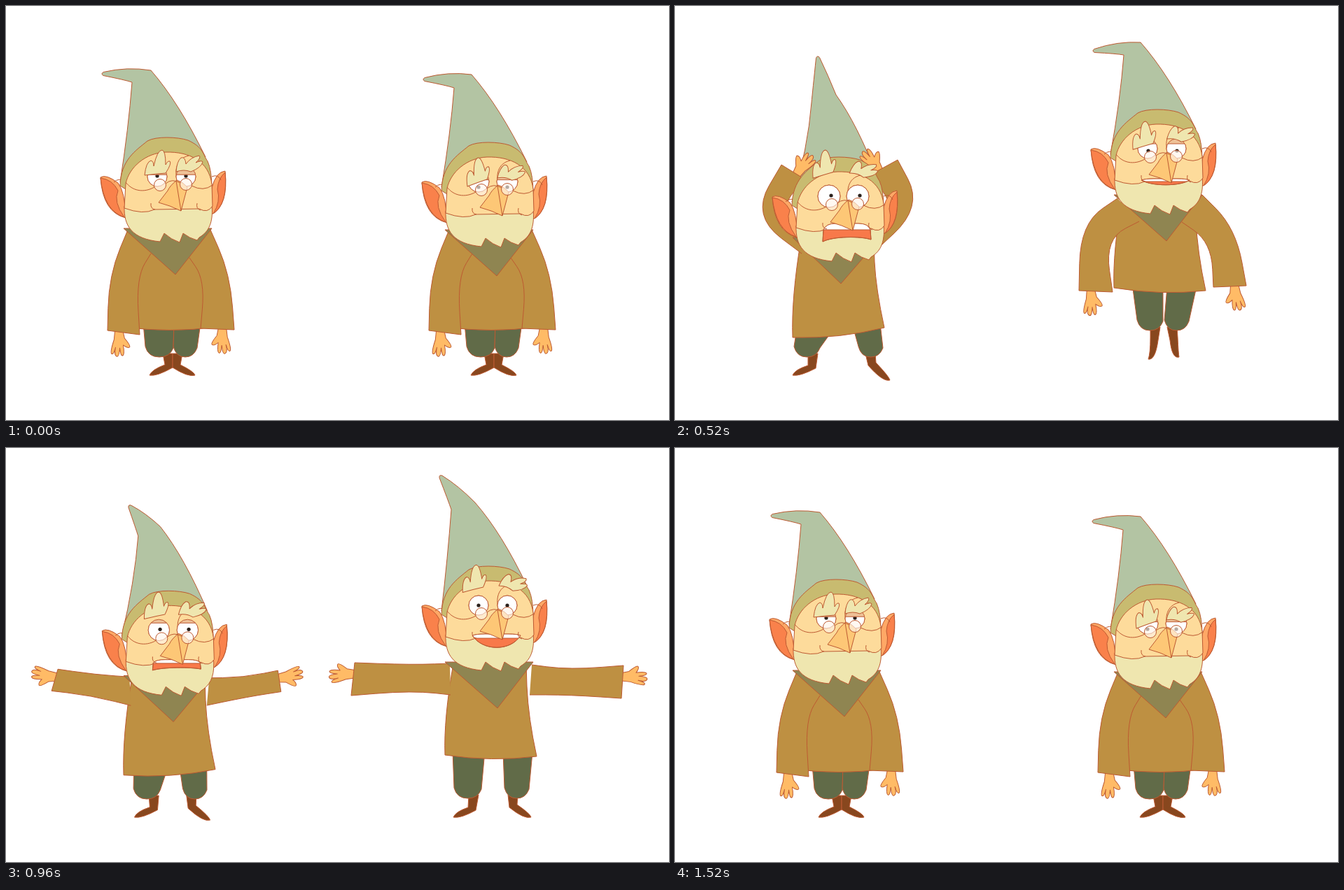
Recreate the animation shown at these times as an HTML page with a canvas. Size 947x592 px, loop 1600 ms.

```html
<!DOCTYPE html>
<html lang="en">
<head>
<meta charset="utf-8">
<title>Two gnomes</title>
<style>
html, body { margin: 0; width: 100%; height: 100%; overflow: hidden; background: #fff; }
canvas { display: block; }
</style>
</head>
<body>
<canvas id="stage" width="947" height="592"></canvas>
<script>
const ctx = document.getElementById('stage').getContext('2d');
const LINE = '#bd5a32', SKIN = '#fddb9b', HAND = '#ffbb66', BEARD = '#efe6af', COAT = '#be9042';
const HAT = '#b3c4a3', HOOD = '#c8bb70', SCARF = '#8f8551', PANTS = '#616b48', SHOE = '#88471e';
const EAR = '#ffa866', EAR_IN = '#f9814b', NOSE = '#fdc776', LID = '#eec197', MOUTH = '#f8794a';

// Arm: shoulder, outer elbow, outer cuff, inner cuff, inner elbow, armpit.
// Leg: top left/right, bulge left/right, bulge bottom, ankle x, heel, toe.
// Body: shoulder y, scarf tip x, left and right hem. Mouth: heights of its edges.
const rest = {
  head: [0, 0], hat: [139, 97, 180, 109, 207, 92], body: [318, 242, 459, 459],
  armL: [174, 320, 147, 385, 145, 464, 191, 470, 186, 388, 207, 354],
  armR: [292, 320, 320, 383, 326, 463, 278, 461, 284, 392, 262, 360],
  legL: [196, 240, 199, 239, 502, 231, 238, 517, 205, 528],
  legR: [240, 278, 239, 273, 502, 245, 238, 517, 270, 528],
  eyes: [.4, 14, 0, -1], brows: [0, 0, 0, 0, 0, 0],
  mouth: [289, 291, 291, 291, 291, 291], flip: [1]
};
const sad = {
  ...rest, head: [0, 7], hat: [139, 98, 181, 110, 206, 91], body: [320, 242, 459, 459],
  eyes: [.42, 15, 0, 8], brows: [-2, 5, -.25, 1, 5, .15]
};
const shrug = {
  ...rest, head: [2, 11], body: [324, 239, 462, 457],
  armL: [176, 324, 112, 351, 93, 434, 138, 450, 148, 371, 207, 356],
  armR: [294, 325, 352, 350, 365, 433, 318, 436, 321, 368, 265, 359],
  legL: [174, 226, 167, 210, 497, 196, 203, 510, 174, 528],
  legR: [238, 279, 236, 270, 503, 247, 238, 518, 270, 528],
  eyes: [1, 15, 0, 0], brows: [-4, -10, 0, -1, -10, 0],
  mouth: [288, 286, 293, 298, 298, 298]
};
const raised = {
  ...rest, head: [4, 25], hat: [168, 60, 186, 103, 219, 94], body: [330, 237, 472, 460],
  armL: [182, 325, 146, 296, 169, 256, 128, 234, 102, 321, 185, 357],
  armR: [284, 325, 318, 292, 297, 247, 341, 229, 360, 302, 284, 353],
  legL: [173, 222, 170, 207, 502, 197, 201, 518, 168, 528],
  legR: [254, 293, 264, 299, 502, 278, 273, 514, 300, 528],
  eyes: [0, 16, 3, -1], brows: [-8, -25, -.2, 3, -18, .2],
  mouth: [292, 283, 293, 307, 300, 306]
};
const panic = {
  ...raised, head: [4, 28], hat: [200, 46, 191, 110, 226, 99], body: [331, 237, 474, 460],
  armL: [182, 326, 148, 290, 186, 248, 152, 227, 109, 300, 181, 354],
  armR: [284, 326, 316, 285, 276, 243, 318, 220, 354, 287, 284, 352],
  legR: [253, 293, 262, 297, 502, 279, 276, 514, 307, 535],
  brows: [-8, -27, -.2, 4, -20, .3], mouth: [292, 283, 292, 309, 301, 306]
};
const jump = {
  ...rest, head: [0, -40], hat: [140, 104, 182, 110, 206, 92], body: [270, 243, 403, 407],
  armL: [173, 275, 120, 311, 118, 407, 166, 409, 155, 333, 204, 308],
  armR: [294, 270, 342, 318, 357, 400, 310, 402, 307, 338, 265, 309],
  legL: [194, 238, 201, 238, 464, 227, 231, 478, 217, 505],
  legR: [244, 286, 240, 275, 464, 251, 248, 478, 261, 502],
  eyes: [.25, 14, 1, 3], brows: [-6, 0, -.2, 2, -3, .2],
  mouth: [289, 287, 291, 289, 298, 289]
};
const open = {
  ...rest, head: [0, -19], hat: [162, 60, 177, 107, 211, 97], body: [306, 243, 439, 441],
  armL: [175, 308, 121, 310, 39, 307, 34, 354, 121, 347, 176, 353],
  armR: [292, 310, 346, 317, 423, 311, 420, 358, 346, 353, 289, 353],
  legL: [179, 225, 181, 220, 501, 209, 212, 518, 180, 528],
  legR: [251, 293, 253, 288, 501, 265, 260, 514, 291, 528],
  eyes: [0, 14, 0, 0], brows: [-7, -19, -.15, 4, -14, .35],
  mouth: [287, 285, 291, 287, 310, 287], flip: [-1]
};

const lerp = (a, b, t) => a + (b - a) * t;
const mixList = (a, b, t) => a.map((v, i) => lerp(v, b[i], t));
const mix = (a, b, t) => Object.fromEntries(Object.keys(a).map(k => [k, mixList(a[k], b[k], t)]));

// Halfway between two poses with the arms swung out sideways.
function swing(a, b, reach) {
  const pose = mix(a, b, .5);
  for (const k of ['armL', 'armR']) {
    const out = open[k].map((v, i) => v + i % 2 * 20);
    pose[k] = mixList(pose[k], out, reach);
  }
  return pose;
}

const leftKeys = [[0, rest], [160, shrug], [240, swing(shrug, raised, .65)], [320, raised],
  [420, panic], [860, panic], [980, swing(rest, panic, .9)], [1120, rest], [1600, rest]];
const rightKeys = [[0, sad], [290, sad], [400, mix(sad, jump, -.14)], [490, mix(sad, jump, 1.03)],
  [520, jump], [630, mix(jump, open, .75)], [720, open], [1140, open],
  [1320, mix(open, sad, .55)], [1480, sad], [1600, sad]];

function poseAt(keys, t) {
  const i = keys.findIndex(k => k[0] > t);
  const [t0, a] = keys[i - 1], [t1, b] = keys[i];
  return mix(a, b, (t - t0) / (t1 - t0));
}

function paint(path, fill, outline = path) {
  if (fill) { ctx.fillStyle = fill; ctx.fill(path); }
  if (outline) ctx.stroke(outline);
}
const shape = (d, fill) => paint(new Path2D(d), fill);
const disc = (x, y, r, fill) => {
  const p = new Path2D();
  p.arc(x, y, r, 0, 7);
  paint(p, fill);
};
function placed(x, y, angle, draw) {
  ctx.save();
  ctx.translate(x, y);
  ctx.rotate(angle);
  draw();
  ctx.restore();
}

function hat([tx, ty, lx, ly, rx, ry]) {
  const a = Math.atan2(ty - (ly + ry) / 2, tx - (lx + rx) / 2);
  const px = -Math.sin(a) * 2.5, py = Math.cos(a) * 2.5;
  const ex = tx + Math.cos(a) * 4, ey = ty + Math.sin(a) * 4;
  const ux = tx + px, uy = ty + py, lox = tx - px, loy = ty - py;
  shape(`M163 252Q${lx - 5} 175 ${lx} ${ly}Q${lerp(lx, lox, .25)} ${lerp(ly, loy, .25) - 1} ${lox} ${loy}
    Q${ex} ${ey} ${ux} ${uy}Q${(ux + rx) / 2} ${(uy + ry) / 2 - (rx - ux) * .1} ${rx} ${ry}
    Q${(rx + 285) / 2 + 1} ${(ry + 216) / 2 - 16} 285 216Z`, HAT);
}

const handPath = 'M-5 -6L-7 11Q-13 28 -11 31Q-8 33 -5 22Q-8 34 -3 35Q0 35 1 23Q2 35 5 34Q8 32 6 19Q12 24 15 22Q17 20 8 9L5 -6Z';

function hand(arm, side) {
  const [, , ex, ey, cx, cy, dx, dy, fx, fy] = arm;
  const angle = Math.atan2(cy + dy - ey - fy, cx + dx - ex - fx) - Math.PI / 2;
  placed(lerp(cx, dx, .35), lerp(cy, dy, .35), angle, () => {
    ctx.scale(side, 1);
    shape(handPath, HAND);
  });
}

function sleeve([sx, sy, ex, ey, cx, cy, dx, dy, fx, fy, ax, ay]) {
  const bend = (x0, y0, x, y, x1, y1) =>
    `L${lerp(x, x0, .6)} ${lerp(y, y0, .6)}Q${x} ${y} ${lerp(x, x1, .6)} ${lerp(y, y1, .6)}L${x1} ${y1}`;
  shape(`M${sx} ${sy}${bend(sx, sy, ex, ey, cx, cy)}L${dx} ${dy}${bend(dx, dy, fx, fy, ax, ay)}`, COAT);
}

function leg([l, r, bl, br, by, ankle, hx, hy, tx, ty], top, side) {
  const fx = hx + side * 11, fy = hy - 4;
  shape(`M${ankle - 7} ${by - 5}L${side < 0 ? `${fx} ${fy}` : `${hx} ${hy}`}
    ${side < 0 ? `Q${tx + 3} ${ty - 8} ${tx} ${ty}Q${tx + 10} ${ty + 2} ${hx} ${hy}`
               : `Q${tx - 10} ${ty + 3} ${tx} ${ty}Q${tx - 1} ${ty - 5} ${fx} ${fy}`}
    L${ankle + 7} ${by - 5}Z`, SHOE);
  const mid = (bl + br) / 2;
  shape(`M${l} ${top}L${bl} ${by - 15}Q${bl + 4} ${by} ${mid} ${by}Q${br - 5} ${by} ${br} ${by - 13}L${r} ${top}Z`, PANTS);
}

function torso([sy, , hemL, hemR]) {
  shape(`M180 ${sy + 2}Q166 ${(sy + hemL) / 2 + 15} 168 ${hemL}Q235 ${(hemL + hemR) / 2 + 9} 299 ${hemR}
    Q287 ${hemR - 55} 285 ${sy + 35}L284 ${sy + 2}`, COAT);
}

function eye(x, y, [lid, r, gx, gy]) {
  disc(x, y, r, LID);
  if (lid > .97) return;
  const cut = y - r + 2 * r * Math.max(0, lid);
  ctx.save();
  ctx.beginPath();
  ctx.rect(x - r - 1, cut - (lid > 0 ? 0 : 1), 2 * r + 2, 2 * r + 2);
  ctx.clip();
  disc(x, y, r, '#fff');
  ctx.fillStyle = '#2b211c';
  ctx.beginPath();
  ctx.arc(x + gx, y + gy, 2.6, 0, 7);
  ctx.fill();
  ctx.restore();
  if (lid > 0) {
    const w = Math.sqrt(Math.max(0, r * r - (cut - y) ** 2));
    shape(`M${x - w} ${cut}h${2 * w}`);
  }
}

function mouth([y, top, teeth, bl, bm, br]) {
  const p = new Path2D(`M208 ${y}Q212 ${top} 225 ${top}L258 ${top}Q272 ${top} 275 ${y}
    L276 ${br}C262 ${bm} 222 ${bm} 207 ${bl}Z`);
  paint(p, MOUTH);
  ctx.save();
  ctx.clip(p);
  ctx.fillStyle = '#fff';
  ctx.fillRect(200, top - 4, 85, teeth - top + 4);
  shape(`M200 ${teeth}H285`);
  ctx.restore();
  ctx.stroke(p);
}

function head({ eyes, brows, mouth: lips }) {
  shape('M135 245Q143 240 160 253Q170 265 171 303Q138 295 135 245Z', EAR);
  shape('M135 246Q152 248 160 264Q153 280 169 302Q140 293 135 246Z', EAR_IN);
  shape('M313 236Q300 237 294 260L294 298Q318 285 313 236Z', EAR);
  shape('M313 238Q303 246 302 262Q307 280 296 297Q317 283 313 238Z', EAR_IN);
  shape('M154 252Q161 245 170 251M294 244Q303 240 307 249');
  shape('M163 257C164 220 185 207 202 193C214 186 245 187 260 192C282 202 281 212 288 222Q294 235 294 262L171 262Z', HOOD);
  shape('M169 286C168 315 180 333 220 337L226 325Q236 334 248 338L253 325Q262 332 273 335Q276 330 279 329C292 320 296 305 294 284Z', BEARD);
  shape('M171 254C176 230 200 210 228 209C262 208 290 222 294 255L295 286Q288 297 276 290L212 291Q196 299 169 289Z', SKIN);
  if (lips[5] - lips[1] > .6) mouth(lips);
  shape('M207 282Q206 290 213 291M273 282Q271 290 278 292');
  shape('M245 251C240 236 243 218 261 214');
  eye(216, 244, eyes);
  eye(257, 244, eyes);
  shape('M244 249Q234 257 231 264L218 281Q234 285 250 293L259 259Q252 251 244 249Z', NOSE);
  shape('M243 250L250 293');
  shape('M212 259C196 268 180 264 171 252M228 254Q237 246 249 253M265 257Q282 266 295 256');
  disc(220, 256, 8.5, 'rgba(255,244,234,.65)');
  disc(257, 255, 8.5, 'rgba(255,244,234,.65)');
  const [lx, ly, la, rx, ry, ra] = brows;
  placed(216 + lx, 228 + ly, la, () => {
    ctx.translate(-216, -228);
    shape('M198 242Q200 223 207 221Q211 222 211 229Q216 206 223 206Q228 207 228 227Q231 221 234 222Q237 225 228 239Q214 240 198 242Z', BEARD);
  });
  placed(262 + rx, 228 + ry, ra, () => {
    ctx.translate(-262, -228);
    shape('M243 237Q244 222 250 217Q256 215 257 226Q264 216 276 214Q279 217 271 224Q280 220 281 223Q279 231 264 237Q254 233 243 237Z', BEARD);
  });
}

function gnome(x, pose) {
  const { body, armL, armR, legL, legR, flip } = pose, [sy, tipX, hemL, hemR] = body;
  const onHead = draw => placed(...pose.head, 0, draw);
  ctx.save();
  ctx.translate(x, 0);
  leg(legL, hemL - 6, -1);
  leg(legR, hemR - 6, 1);
  onHead(() => hat(pose.hat));
  hand(armL, flip[0]);
  hand(armR, -flip[0]);
  torso(body);
  sleeve(armL);
  sleeve(armR);
  shape(`M168 ${sy}L${tipX} ${sy + 66}L294 ${sy}Z`, SCARF);
  onHead(() => head(pose));
  ctx.restore();
}

function frame(now) {
  const t = Math.min(1520, Math.floor(now % 1600 / 40) * 40);
  ctx.fillStyle = '#fff';
  ctx.fillRect(0, 0, 947, 592);
  ctx.strokeStyle = LINE;
  ctx.lineWidth = 1;
  ctx.lineJoin = 'round';
  gnome(0, poseAt(leftKeys, t));
  gnome(459, poseAt(rightKeys, t));
  requestAnimationFrame(frame);
}
frame(0);
</script>
</body>
</html>
```
